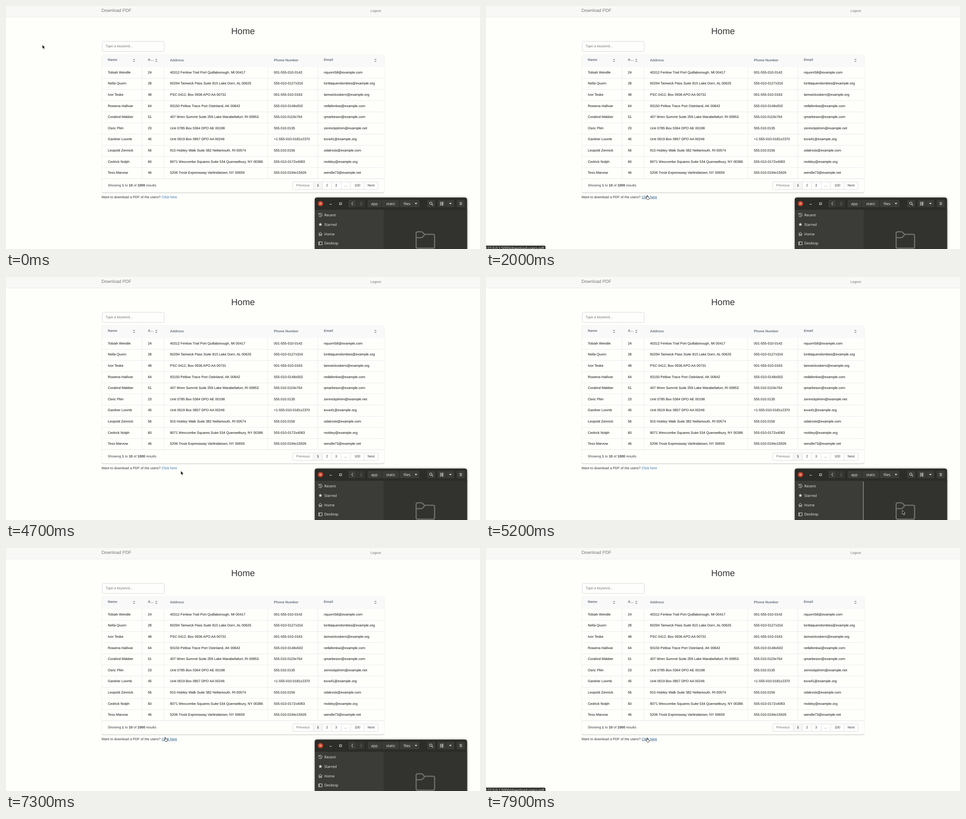
Recreate the animation shown at these times as an HTML page. Size 1044x536 px, loop 8000 ms.

```html
<!DOCTYPE html>
<html lang="en">
<head>
<meta charset="utf-8">
<title>Download PDF</title>
<style>
  html, body { margin: 0; width: 100%; height: 100%; overflow: hidden; background: #fefefb; }
  svg { display: block; width: 1044px; height: 536px; }
  text { font: 7.61px "Liberation Sans", Arial, sans-serif; text-rendering: geometricPrecision; white-space: pre; }
  .b { font-weight: 700; }
  .mid { text-anchor: middle; }
  .ui { font: 8px "Open Sans", "Noto Sans", sans-serif; fill: #f1f1ef; }
</style>
</head>
<body>
<svg id="stage" viewBox="0 0 1044 536">
  <defs>
    <filter id="soft" x="-10%" y="-10%" width="120%" height="120%"><feGaussianBlur stdDeviation="2.4"/></filter>
    <filter id="faint" x="-5%" y="-5%" width="110%" height="110%"><feGaussianBlur stdDeviation=".6"/></filter>
  </defs>
  <g id="page"></g>
  <g id="files"></g>
  <g id="status">
    <path d="M0 528.5H128.5Q131 528.5 131 531V536H0Z" fill="#353532"/>
    <text class="ui" x="-1" y="537.2" style="font-size:7.8px">127.0.0.1:5000/download-users-pdf</text>
  </g>
  <g id="cursor">
    <path id="arrow" d="M0 -.4V8.4L2 6.6L3.5 9.9L5 9.2L3.6 6.1L6.3 5.8Z" fill="#111" stroke="#fff" stroke-width=".7" stroke-linejoin="round"/>
    <path id="hand" d="M2 6V1.2Q2 .4 2.8 .4T3.6 1.2V4.1Q4.3 3.6 4.9 4.3Q5.6 3.9 6.1 4.6Q7.3 4.3 7.3 5.6V7.4Q7.1 8.6 6.6 9.8H3Q2.2 8.5 .8 7.1Q0 6 .8 5.5Q1.4 5.3 2 6Z" fill="#fff" stroke="#111" stroke-width=".75" stroke-linejoin="round"/>
  </g>
</svg>
<script>
const NS = "http://www.w3.org/2000/svg";
const $ = id => document.getElementById(id);
let layer = $("page");

function add(tag, attrs) {
  const el = document.createElementNS(NS, tag);
  for (const k in attrs) el.setAttribute(k, attrs[k]);
  return layer.appendChild(el);
}
const box = (x, y, width, height, fill, more) => add("rect", { x, y, width, height, fill, ...more });
const path = (d, stroke, width = 1, fill = "none") => add("path", { d, stroke, fill, "stroke-width": width });
function label(x, y, str, fill = "#111", cls = "") {
  const el = add("text", { x, y, fill, class: cls });
  el.textContent = str;
  return el;
}

const people = [
  ["Tobiah Wendle", 24, "40312 Fenlow Trail Port Quillaborough, MI 00417", "001-555-010-0142", "nquorn58@example.com"],
  ["Nella Quorn", 28, "60294 Tamwick Pass Suite 815 Lake Dorn, AL 00625", "555-010-0127x316", "lorittaquendombes@example.org"],
  ["Ivor Teske", 48, "PSC 0412, Box 0936 APO AA 00731", "001-555-010-0163", "tamwickosbern@example.org"],
  ["Rowena Hallivar", 64, "93150 Pellow Trace Port Ostinland, AK 00842", "555-010-0148x502", "nellafenlow@example.com"],
  ["Coralind Mabber", 51, "407 Wren Summit Suite 259 Lake Marabellafurt, RI 00953", "555.010.0119x764", "qmarbeson@example.com"],
  ["Osric Plim", 23, "Unit 0785 Box 0364 DPO AE 00198", "555.010.0135", "zennickplimm@example.net"],
  ["Gardner Loomb", 45, "Unit 0619 Box 0857 DPO AA 00246", "+1-555-010-0181x2370", "tova41@example.org"],
  ["Leopold Zennick", 56, "915 Hobley Walk Suite 382 Nellamouth, RI 00574", "555.010.0156", "odatrosk@example.com"],
  ["Cedrick Nolph", 60, "8071 Wexcombe Squares Suite 534 Quensetbury, NY 00386", "555-010-0172x4083", "mobley@example.org"],
  ["Tess Marvow", 46, "5206 Trosk Expressway Varlindatown, NY 00659", "555.010.0194x15926", "wendle73@example.net"]
];
const cols = [224.3, 312.4, 361.3, 590, 700];

function drawPage() {
  box(0, 0, 1044, 24, "#f8f8f7");
  box(0, 24, 1044, .8, "#e6e6e4");
  label(210.3, 13.2, "Download PDF", "#777").style.fontSize = "9.79px";
  label(802.5, 12.6, "Logout", "#777");
  label(522, 61.6, "Home", "#333", "mid").style.fontSize = "19.58px";

  box(212, 78, 136.5, 22.3, "#fefefc", { stroke: "#d2d6dc", "stroke-width": .9, rx: 3 });
  label(219.5, 90.8, "Type a keyword...", "#777");

  // Table card
  box(210.8, 106.6, 622.4, 305.8, "#000", { rx: 4, opacity: .26, filter: "url(#faint)" });
  box(211, 106, 622, 305.6, "#fefefb", { rx: 4 });
  path("M211 135V110Q211 106 215 106H829Q833 106 833 110V135Z", "none", 0, "#f8f9f8");
  ["Name", "A…", "Address", "Phone Number", "Email"].forEach((h, i) =>
    label(cols[i], i == 2 || i == 3 ? 122 : 121, h, "#6b7280", "b"));
  for (const x of [282, 331, 813.7])
    path(`M${x - 2.8} 119.1L${x} 116.1L${x + 2.8} 119.1ZM${x - 2.8} 121L${x} 124L${x + 2.8} 121Z`, "none", 0, "#a3a5a8");

  people.forEach((row, r) => {
    const y = 135 + r * 24.6;
    row.forEach((cell, c) => label(cols[c], y + 13.8, cell));
    if (r) box(211, y - .4, 620, .8, "#e5e7eb");
  });
  for (const x of [299.3, 347.8, 576.5, 686.5]) box(x - .4, 135, .8, 246, "#e5e7eb");
  box(211, 380.4, 622, .9, "#dfe1e5");

  const note = label(224.3, 397.6, "", "#3d4044");
  "Showing |1| to |10| of |1000| results".split("|").forEach((s, i) => {
    const span = document.createElementNS(NS, "tspan");
    span.textContent = s;
    if (i % 2) span.setAttribute("class", "b");
    note.append(span);
  });
  box(631.2, 388, 188.6, 16.6, "#fefefc", { stroke: "#d2d6dc", "stroke-width": .8, rx: 3 });
  box(677, 388.4, 20, 15.8, "#f6f6f5");
  for (const x of [677, 697, 717, 738, 759, 789]) box(x - .4, 388, .8, 16.6, "#d8dbe0");
  [["Previous", 654, "#777"], ["1", 687], ["2", 707], ["3", 727], ["...", 748], ["100", 774], ["Next", 804]]
    .forEach(([s, x, c = "#3c4049"]) => label(x, 398.4, s, c, s == "1" ? "mid b" : "mid"));

  label(210.2, 423.8, "Want to download a PDF of the users?", "#333");
}

function drawFiles() {
  const ink = "#e4e4e1", btn = "#3b3b37", edge = "#272723";
  box(680, 422.5, 336, 130, "#000", { rx: 6, opacity: .38, filter: "url(#soft)" });
  path("M680 536V427Q680 422.5 685 422.5H1010Q1015.5 422.5 1015.5 427V536Z", "none", 0, "#2c2c28");
  box(680, 449, 152.3, 87, "#3b3b38");
  box(832.3, 449, 183.2, 87, "#32322e");
  box(680, 448.4, 335.5, .8, edge);

  add("circle", { cx: 692.7, cy: 435.8, r: 5.6, fill: "#cf4a2c" });
  path("M690.7 433.8L694.7 437.8M694.7 433.8L690.7 437.8", "#fff", .9);
  path("M713 437.3H717.4", ink, 1.1);
  path("M734.7 434H738.9V438.2H734.7Z", ink, 1.1);

  const button = (x, w, fill = btn) => box(x, 427, w, 17.6, fill, { rx: 2.5, stroke: edge, "stroke-width": .7 });
  button(753.6, 18.4);
  button(772, 18.6, "#353531");
  path("M764.2 432.3L761.4 435.9L764.2 439.5", ink);
  path("M780.8 432.3L783.6 435.9L780.8 439.5", "#82827e");
  button(796, 31.5);
  button(827.5, 39);
  button(866.5, 44.5);
  [["app", 811.5], ["static", 847.4], ["files", 883.2]].forEach(([s, x]) => label(x, 438.8, s, "", "ui mid"));
  button(927, 19);
  button(950, 19.5);
  button(969.5, 18.5);
  button(992, 19.2);
  for (const x of [903, 978.8]) path(`M${x - 2.9} 434.5H${x + 2.9}L${x} 437.6Z`, "none", 0, ink);
  add("circle", { cx: 935.7, cy: 435, r: 2.7, fill: "none", stroke: ink });
  path("M937.7 437L940.2 439.5", ink, 1.2);
  for (const y of [433, 435.9, 438.8]) path(`M956 ${y}H958M958.9 ${y}H963.3`, ink, 1.6);
  path("M999 433.4H1004.4M999 435.8H1004.4M999 438.2H1004.4", ink, 1);

  rows = [450, 471.3].map(y => box(680, y, 150.5, 20.8, "#fff", { opacity: 0 }));
  ["Recent", "Starred", "Home", "Desktop"].forEach((s, i) => label(701, 463.9 + i * 20.8, s, "", "ui"));
  path("M689.2 458.7A3.9 3.9 0 1 1 688.7 462M688.7 457.2V459.3H690.8M692.4 458.8V461.4L694.3 462.6", ink, .9);
  let star = "";
  for (let i = 0; i < 10; i++) {
    const a = i * Math.PI / 5, r = i % 2 ? 1.8 : 4.4;
    star += (i ? "L" : "M") + (692.4 + r * Math.sin(a)) + " " + (482 - r * Math.cos(a));
  }
  path(star + "Z", "none", 0, ink);
  path("M688.2 503L692.4 498.8L696.6 503M689.6 502V506.5H691.4V503.5H693.4V506.5H695.2V502", ink, .9);
  path("M688.7 520.2H696.3V526.8H688.7ZM690.2 520.2V526.8", ink, 1);

  // Folder outline, then the lip that joins its top edge
  const folder = path("M903.3 531V501.5Q903.3 498 906.8 498H914.5Q916.6 498 918 499.6L921.6 503.6H940.5Q944 503.6 944 507.1V531Q944 534.3 940.5 534.3H906.8Q903.3 534.3 903.3 531ZM903.3 511H914Q916.6 511 918.1 509.2L922.6 503.8", "#6f6f6b", 2.5);
  folder.setAttribute("stroke-linejoin", "round");
  scroll = box(830.6, 451, 1, 85, "#b5b5b1");
}

let rows, scroll;
drawPage();
const link = label(343, 423.8, "Click here");
const line = box(343, 424.7, 33.8, .7, "#23527c");
layer = $("files");
drawFiles();

// Each move: start, end, then points spread evenly between them
const moves = [
  [0, 0, 80, 86],
  [300, 1100, 86, 93, 160, 190, 300, 356, 352, 410, 362, 422],
  [1200, 2000, 361, 429, 359, 429, 357, 425, 354, 420, 352, 417],
  [2600, 2600, 355.5, 417],
  [3000, 3000, 352, 419],
  [3300, 3300, 355, 419.5],
  [4700, 5500, 385, 428, 640, 478, 878, 516, 956, 514, 964, 495],
  [5600, 5600, 966, 484],
  [5800, 6200, 958, 476, 909, 500, 934, 502],
  [6400, 7200, 905, 495, 743, 468, 520, 430, 372, 396, 347, 411],
  [7300, 7800, 348, 417, 351, 418, 352, 418.5]
];

function pointer(t) {
  const [from, to, ...p] = moves.filter(m => m[0] <= t).pop();
  const last = p.length / 2 - 1;
  const k = to > from ? Math.min(1, (t - from) / (to - from)) * last : 0;
  const i = Math.min(Math.floor(k), Math.max(0, last - 1)) * 2, f = k - i / 2;
  const mix = j => last ? p[j] + (p[j + 2] - p[j]) * f : p[j];
  return [mix(i), mix(i + 1)];
}

const show = (el, on) => el.setAttribute("visibility", on ? "visible" : "hidden");
const within = (t, a, b) => t >= a && t < b;

function draw(time) {
  const t = Math.floor(time % 8000 / 100) * 100;
  const [x, y] = pointer(t);
  const hover = x >= 343 && x <= 377 && y > 416 && y < 427.5;
  $("cursor").setAttribute("transform", `translate(${x} ${y})`);
  show($("hand"), hover);
  show($("arrow"), !hover);
  show(line, hover);
  link.setAttribute("fill", hover ? "#23527c" : "#3875ad");
  show($("status"), within(t, 1600, 4700) || t >= 7400);
  show($("files"), t < 7900);
  scroll.setAttribute("opacity", within(t, 5000, 7000) ? 1 : 0);
  rows[0].setAttribute("opacity", t == 6600 ? .05 : t == 6700 ? .02 : 0);
  rows[1].setAttribute("opacity", t == 6600 ? .025 : 0);
}

const start = performance.now();
function tick() {
  draw(performance.now() - start);
  requestAnimationFrame(tick);
}
tick();
</script>
</body>
</html>
```
